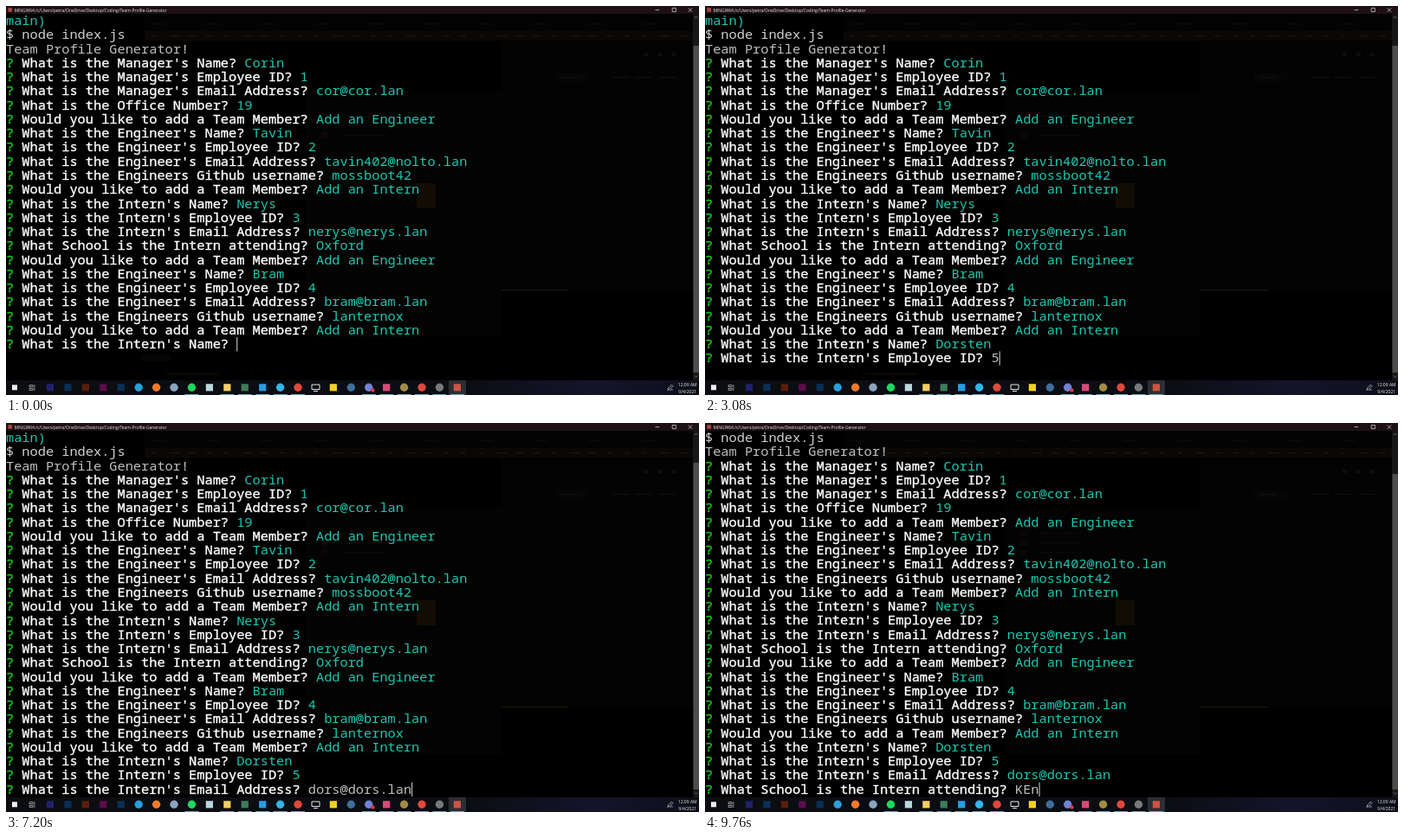
Recreate the animation shown at these times as an HTML page. Size 800 px wide and 450 px high, loop 9880 ms.

```html
<!DOCTYPE html>
<html lang="en">
<head>
<meta charset="utf-8">
<title>Team Profile Generator</title>
<style>
html, body { margin: 0; width: 100%; height: 100%; overflow: hidden; background: #000; }
svg { display: block; width: 800px; height: 450px; }
text { white-space: pre; }
.term { font: 15.3px "Noto Sans Mono", "DejaVu Sans Mono", monospace; }
.bold { stroke-width: 0.35px; }
.ui { font-family: "Open Sans", "Noto Sans", sans-serif; fill: #e8e8e8; }
</style>
</head>
<body>
<svg id="stage" viewBox="0 0 800 450"></svg>
<script>
const LOOP = 9880, BLINK = 520;
const COL = 9.18, ROW = 16.27, TOP = 9, ROWS = 26;
const WHITE = '#fff', GREY = '#bfbfbf', TEAL = '#1dc8b0', GREEN = '#16d016';

const stage = document.getElementById('stage');

function add(tag, attrs, parent = stage) {
  const el = document.createElementNS('http://www.w3.org/2000/svg', tag);
  for (const k in attrs) el.setAttribute(k, attrs[k]);
  parent.appendChild(el);
  return el;
}
const rect = (x, y, width, height, fill, parent) => add('rect', { x, y, width, height, fill }, parent);
const dot = (cx, cy, r, fill) => add('circle', { cx, cy, r, fill });
const line = (d, stroke = '#ddd', w = 0.7) => add('path', { d, stroke, 'stroke-width': w, fill: 'none' });
function label(str, x, y, size, anchor = 'start') {
  add('text', { x, y, class: 'ui', 'font-size': size, 'text-anchor': anchor }).textContent = str;
}

// Terminal content
const before = [
  ["Manager's Name", 'Corin'], ["Manager's Employee ID", '1'],
  ["Manager's Email Address", 'cor@cor.lan'], ['Office Number', '19'], ['', 'Add an Engineer'],
  ["Engineer's Name", 'Tavin'], ["Engineer's Employee ID", '2'],
  ["Engineer's Email Address", 'tavin402@nolto.lan'], ['Engineers Github username', 'mossboot42'],
  ['', 'Add an Intern'],
  ["Intern's Name", 'Nerys'], ["Intern's Employee ID", '3'],
  ["Intern's Email Address", 'nerys@nerys.lan'], ['school', 'Oxford'], ['', 'Add an Engineer'],
  ["Engineer's Name", 'Bram'], ["Engineer's Employee ID", '4'],
  ["Engineer's Email Address", 'bram@bram.lan'], ['Engineers Github username', 'lanternox'],
  ['', 'Add an Intern']
];

// Live prompts: start, key times, time of Enter
const live = [
  { ask: "Intern's Name", answer: 'Dorsten', start: -480, keys: [400, 560, 680, 800, 960, 1080, 1240], enter: 1520 },
  { ask: "Intern's Employee ID", answer: '5', start: 1560, keys: [2880], enter: 3160 },
  { ask: "Intern's Email Address", answer: 'dors@dors.lan', start: 3200,
    keys: [4480, 4640, 4800, 4880, 5240, 5520, 5560, 5720, 6000, 6680, 6880, 6960, 7160], enter: 7360 },
  { ask: 'school', answer: 'KEn', start: 7360, keys: [9400, 9560, 9760], enter: Infinity }
];

function question(ask) {
  if (!ask) return ' Would you like to add a Team Member? ';
  if (ask === 'school') return ' What School is the Intern attending? ';
  return ` What is the ${ask}? `;
}

// Windows faintly visible through the terminal
function backdrop() {
  rect(0, 0, 800, 450, '#000');
  rect(160, 9, 633, 20, '#040303');
  rect(160, 29, 633, 11, '#0a0707');
  for (let i = 0; i < 30; i++) {
    const x = 168 + i * 21;
    rect(x, 34, 4 + i * 7 % 9, 1.5, '#191414');
    if (i % 3 === 0) rect(x, 20, 16, 1.2, '#0e0a0a');
  }
  rect(346, 98, 226, 285, '#030303');
  rect(572, 42, 221, 287, '#030303');
  rect(634, 78, 38, 9, '#060606');
  for (const x of [640, 700, 726, 754]) rect(x, 82, 20, 1.2, '#120f0f');
  for (const x of [736, 752, 768]) rect(x, 54, 5, 4, '#0e0c0c');
  for (const y of [124, 135, 146]) {
    rect(364, y, 8, 7, '#0d0606');
    rect(386, y + 3, 50, 1.2, '#0a0a0a');
  }
  rect(474, 205, 22, 29, '#110d04');
  rect(572, 328, 78, 1.4, '#1a1408');
  rect(157, 404, 33, 7, '#060606');
  rect(185, 425, 60, 1.2, '#0f0f0f');
}

function titleBar() {
  rect(0, 0, 800, 9, '#1e1114');
  rect(2.4, 2.2, 4.6, 4.6, '#a8483e');
  label('MINGW64:/c/Users/petra/OneDrive/Desktop/Coding/Team-Profile-Generator', 9.5, 6.5, 4.95);
  line('M749.5 4.6h4.6M769.2 2.4h4.2v4.2h-4.2zM787.7 2.4l4.4 4.4m0-4.4l-4.4 4.4');
}

function taskBar() {
  const tint = add('linearGradient', { id: 'tint' });
  for (const [offset, color] of [[0, '#0b0d11'], [0.66, '#0b0d13'], [0.85, '#15142b'], [1, '#0e0e1a']])
    add('stop', { offset, 'stop-color': color }, tint);
  rect(0, 433, 800, 17, 'url(#tint)');
  rect(511, 433, 20, 17, '#2b2e32');
  rect(7, 438.3, 6, 6, '#f0f0f0');
  line('M27 438.6h4v2h-4zM27 442.4h4v2h-4zM32.8 438v7', '#ccc');
  // colour, then s = square or c = circle
  const icons = [
    ['#20206e', 's'], ['#0b2f55', 's'], ['#5a1c08', 's'], ['#5b0c4b', 's'], ['#0a2f58', 's'],
    ['#2a9fd8', 'c'], ['#f2792c', 'c'], ['#8ba3bd', 'c'], ['#1ed760', 'c'], ['#b9d7df', 's'],
    ['#f5cf62', 's'], ['#3c7d5b', 's'], ['#279be5', 's'], ['#35b4e8', 'c'], ['#e0493a', 'c'],
    ['', ''], ['#f4d21f', 's'], ['#3e6f9d', 'c'], ['#7183d6', 'c'], ['#d84a77', 's'],
    ['#a08c45', 'c'], ['#e0493a', 'c'], ['#77797b', 'c'], ['#d05343', 's']
  ];
  icons.forEach(([fill, kind], i) => {
    const x = 51 + i * 20.43;
    if (kind === 's') rect(x - 4.1, 437.2, 8.2, 8.2, fill);
    if (kind === 'c') dot(x, 441.3, 4.7, fill);
  });
  line('M353 438h9v5.5h-9zM355 445.5h5', '#e4e4e4', 1);
  dot(423.4, 444.4, 2.2, '#e23c3c');
  for (const i of [8, 10, 11, 12, 13, 14, 18, 19, 20, 21, 22, 23])
    rect(51 + i * 20.43 - 8, 449, 16, 1, '#6da6bb');
  line('M763.8 444.4l1-2.6 3.7-3.7 1.5 1.5-3.7 3.7zM766.5 444.6q2-1.7 3.4-.4');
  label('12:09 AM', 786.7, 439.6, 5, 'middle');
  label('9/4/2021', 786.7, 448.2, 5, 'middle');
}

backdrop();
const clip = add('clipPath', { id: 'pane' });
rect(0, TOP, 793, 424, '#fff', clip);
const pane = add('g', { 'clip-path': 'url(#pane)' });
const scroll = add('g', {}, pane);

rect(793, 9, 7, 424, '#171717');
const thumb = rect(793.5, 46, 6.5, 378, '#4d4d4d');
line('M794.8 14l1.8-2 1.8 2M794.8 427.5l1.8 2 1.8-2', '#8a8a8a');
titleBar();
taskBar();

let count = 0;
function row(...parts) {
  const el = add('text', { class: 'term', x: 0, y: TOP + 13 + ROW * count++ }, scroll);
  const spans = parts.map(([str, fill, bold]) => {
    const span = add('tspan', bold ? { fill, stroke: fill, class: 'bold' } : { fill }, el);
    span.textContent = str;
    return span;
  });
  return { el, spans };
}
const ask = (q, a) => row(['?', GREEN, true], [question(q), WHITE, true], [a, TEAL]);

row(['main)', TEAL]);
row(['$ node index.js', '#d0d0d0']);
row(['Team Profile Generator!', GREY]);
before.forEach(([q, a]) => ask(q, a));
for (const p of live) {
  p.index = count;
  p.width = question(p.ask).length + 1;
  p.row = ask(p.ask, '');
}
const caret = rect(0, 0, 1, ROW, '#d8d8d8', scroll);

function draw(t) {
  let now = live[0];
  for (const p of live) {
    const shown = t >= p.start, done = t >= p.enter;
    const typed = p.keys.filter(k => t >= k).length;
    p.row.el.setAttribute('visibility', shown ? 'visible' : 'hidden');
    const text = p.row.spans[2];
    text.textContent = p.answer.slice(0, typed);
    text.setAttribute('fill', done ? TEAL : GREY);
    if (shown) { now = p; now.typed = typed; }
  }
  const last = now.typed ? now.keys[now.typed - 1] : now.start;
  const on = t < now.enter && Math.floor((t - last) / BLINK) % 2 === 0;
  caret.setAttribute('visibility', on ? 'visible' : 'hidden');
  caret.setAttribute('x', (now.width + now.typed) * COL);
  caret.setAttribute('y', TOP + ROW * now.index);

  const over = Math.max(0, now.index + 1 - ROWS);
  scroll.setAttribute('transform', `translate(0 ${-over * ROW})`);
  thumb.setAttribute('y', 46 + over * 13);
  thumb.setAttribute('height', 378 - over * 13);
}

const begin = performance.now();
function tick() {
  draw((performance.now() - begin) % LOOP);
  requestAnimationFrame(tick);
}
tick();
</script>
</body>
</html>
```
